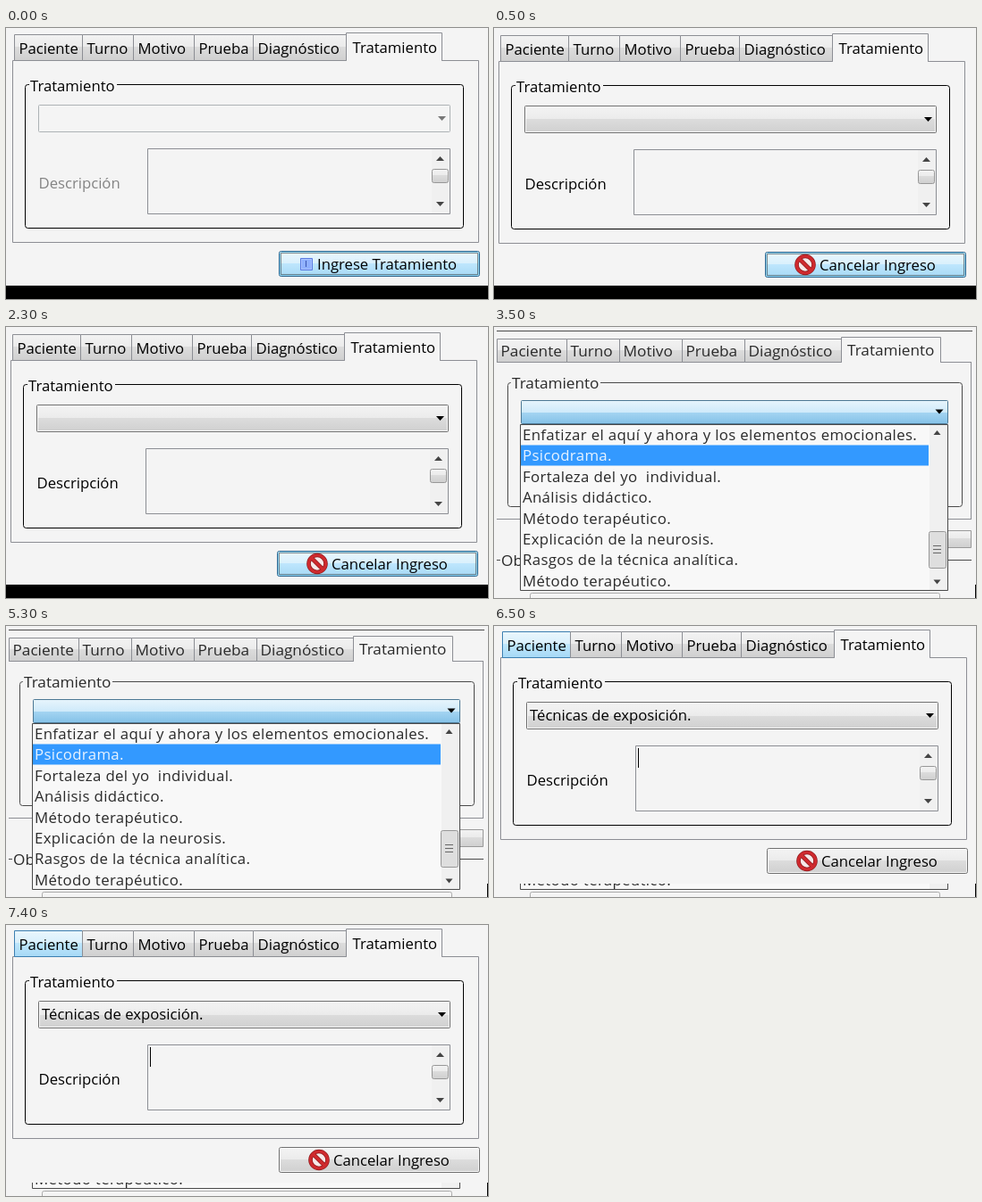
An HTML page with a canvas that plays this animation: 539 px wide and 304 px high, repeating every 8000 ms.

```html
<!DOCTYPE html>
<html lang="es">
<head>
<meta charset="utf-8">
<style>
  html, body { margin: 0; width: 100%; height: 100%; overflow: hidden; background: #f4f4f4; }
  canvas { display: block; }
</style>
</head>
<body>
<canvas id="stage" width="539" height="304"></canvas>
<script>
const ctx = document.getElementById('stage').getContext('2d');
const BG = '#f4f4f4', EDGE = '#8c8e94';
const GREY = ['#f3f3f3', '#ebebeb', '#dcdcdc', '#d0d0d0'];
const BLUE = ['#eaf6fd', '#d9f0fc', '#bee6fd', '#a7d9f5'];
const TABS = ['Paciente', 'Turno', 'Motivo', 'Prueba', 'Diagnóstico'];
const OPTIONS = ['Enfatizar el aquí y ahora y los elementos emocionales.', 'Psicodrama.',
  'Fortaleza del yo  individual.', 'Análisis didáctico.', 'Método terapéutico.',
  'Explicación de la neurosis.', 'Rasgos de la técnica analítica.', 'Método terapéutico.'];

function fill(x, y, w, h, color) {
  ctx.fillStyle = color;
  ctx.fillRect(x, y, w, h);
}

// Outlined box whose border lies on the pixels left, top, right, bottom
function box(left, top, right, bottom, border, inside, radius = 0) {
  ctx.beginPath();
  ctx.roundRect(left + .5, top + .5, right - left, bottom - top, radius);
  if (inside) { ctx.fillStyle = inside; ctx.fill(); }
  ctx.strokeStyle = border;
  ctx.lineWidth = 1;
  ctx.stroke();
}

function dotted(left, top, right, bottom, color) {
  ctx.setLineDash([1, 1]);
  box(left, top, right, bottom, color);
  ctx.setLineDash([]);
}

function gloss(top, bottom, colors) {
  const g = ctx.createLinearGradient(0, top, 0, bottom);
  [0, .5, .5, 1].forEach((at, i) => g.addColorStop(at, colors[i]));
  return g;
}

function text(string, x, y, color = '#000', size = 16.7, spacing = 0) {
  ctx.font = `${size}px "Open Sans", "Noto Sans", sans-serif`;
  ctx.letterSpacing = spacing + 'px';
  ctx.fillStyle = color;
  ctx.fillText(string, x, y);
}

// Triangle centred on x, y; a negative height points up
function arrow(x, y, w, h, color) {
  ctx.fillStyle = color;
  ctx.beginPath();
  ctx.moveTo(x - w / 2, y - h / 2);
  ctx.lineTo(x + w / 2, y - h / 2);
  ctx.lineTo(x, y + h / 2);
  ctx.fill();
}

function tabs(edges, top, bottom, baseline, pad, color, size, hot) {
  TABS.forEach((name, i) => {
    const on = i === hot;
    box(edges[i], top, edges[i + 1], bottom, on ? '#3c7fb1' : EDGE, gloss(top, bottom, on ? BLUE : GREY));
    text(name, edges[i] + pad, baseline, color, size);
  });
}

function forbidden(x, y) {
  ctx.beginPath();
  ctx.arc(x, y, 9.5, 0, 7);
  ctx.fillStyle = '#f6e9e9';
  ctx.fill();
  ctx.moveTo(x - 6.5, y - 6.5);
  ctx.lineTo(x + 6.5, y + 6.5);
  for (const [color, width] of [['#8e1a1d', 4.6], ['#cf2a2e', 3.2]]) {
    ctx.strokeStyle = color;
    ctx.lineWidth = width;
    ctx.stroke();
  }
}

function button({ cancel, hot }) {
  box(305, 250, 529, 278, hot ? '#2c628b' : '#707070', gloss(251, 278, hot ? BLUE : GREY), 2);
  box(306, 251, 528, 277, hot ? '#8fd6f3' : '#f8f8f8', null, 1);
  if (hot) dotted(307, 252, 527, 276, '#222');
  if (cancel) {
    forbidden(350, 264.5);
    text('Cancelar Ingreso', 366, 271);
  } else {
    box(329, 258, 342, 271, '#5b7be0', '#8fb0ff');
    dotted(330, 259, 341, 270, '#c3d4ff');
    fill(335, 261, 1, 7, '#3a55b0');
    text('Ingrese Tratamiento', 348, 271);
  }
}

function form(state) {
  const { dx, dy, enabled, choice, caret, hotTab } = state;
  ctx.save();
  ctx.translate(dx, dy);
  fill(-5, -5, 560, 294 - dy, BG);

  box(7, 36, 528, 240, EDGE);
  tabs([9, 85, 142, 210, 276, 380], 7, 36, 29, 5.5, '#000', 16.7, hotTab);
  box(380, 5, 487, 36, EDGE, BG);
  fill(381, 36, 106, 2, BG);
  text('Tratamiento', 387.5, 28);

  box(21, 63, 511, 224, '#000', null, 3);
  fill(26, 60, 98, 8, BG);
  text('Tratamiento', 27, 71);

  box(36, 86, 496, 116, enabled ? '#707070' : '#adb2b5', enabled ? gloss(87, 116, GREY) : BG, 1);
  if (enabled) box(37, 87, 495, 115, '#f8f8f8');
  arrow(487.5, 101.5, 9, 5, enabled ? '#000' : '#777');
  if (choice) text(choice, 40, 107);

  text('Descripción', 36.5, 180, enabled ? '#000' : '#838383');
  box(158, 135, 496, 208, EDGE);
  fill(476, 136, 20, 72, '#f0f0f0');
  arrow(485.5, 146.5, 9, -5, '#444');
  arrow(485.5, 197.5, 9, 5, '#444');
  box(476, 158, 494, 173, '#979797', gloss(158, 173, GREY), 2);
  if (caret) fill(161, 138, 1, 22, '#000');

  button(state);
  ctx.restore();
}

function dropdown() {
  const dark = '#4a4a4a', ink = '#2a2a2a', size = 17.2;
  fill(0, 0, 539, 304, BG);
  fill(538, 289, 1, 15, '#000');
  fill(3, 4, 532, 1, dark);

  fill(3, 39, 531, 1, EDGE);
  tabs([3, 81, 140, 210, 280, 388], 13, 39, 33, 4.5, ink, size);
  box(388, 11, 499, 39, EDGE, BG);
  fill(389, 39, 110, 2, BG);
  text('Tratamiento', 395, 32, ink, size);
  fill(533, 39, 1, 177, EDGE);
  fill(3, 215, 531, 1, EDGE);

  box(15, 62, 523, 201, dark, null, 3);
  fill(19, 58, 100, 9, BG);
  text('Tratamiento', 20, 69, ink, size);

  // Parts of the form behind the list
  box(440, 228, 533, 247, '#999', gloss(228, 247, GREY));
  fill(3, 261, 531, 1, dark);
  fill(7, 255, 30, 12, BG);
  text('Ob', 8, 267.5, ink, size);
  box(40, 298, 498, 320, '#aaa', null, 2);

  box(30, 82, 507, 108, '#4d7894', gloss(83, 108, ['#e6f4fc', '#cfeafa', '#a5d5f2', '#86c2e8']), 1);
  arrow(498, 95, 9, 5, '#000');
  box(29, 109, 507, 295, dark, '#f8f8f8');
  fill(30, 132.5, 456, 23, '#3399ff');
  OPTIONS.forEach((option, i) =>
    text(option, 32, 127 + i * 23.4, i === 1 ? '#e8f3ff' : ink, 16.8, .35));

  fill(487, 110, 20, 185, '#f0f0f0');
  arrow(495.5, 118.5, 8, -5, '#444');
  arrow(495.5, 286, 8, 5, '#444');
  box(486, 229, 505, 270, '#979797', '#dedede', 2);
  for (let y = 245; y <= 253; y += 4) fill(491, y, 9, 1, '#666');
}

function draw(t) {
  if (t < 500) {
    form({ dx: 0, dy: 0, hot: true });
    fill(0, 289, 539, 15, '#000');
  } else if (t < 3500) {
    form({ dx: -2, dy: 1, enabled: true, cancel: true, hot: true });
    fill(0, 289, 539, 15, '#000');
  } else {
    dropdown();
    if (t >= 6500) {
      form({ dx: 0, dy: -1, enabled: true, cancel: true, caret: true, hotTab: 0,
        choice: 'Técnicas de exposición.' });
    }
  }
}

const start = performance.now();
function tick() {
  draw((performance.now() - start) % 8000);
  requestAnimationFrame(tick);
}
tick();
</script>
</body>
</html>
```
